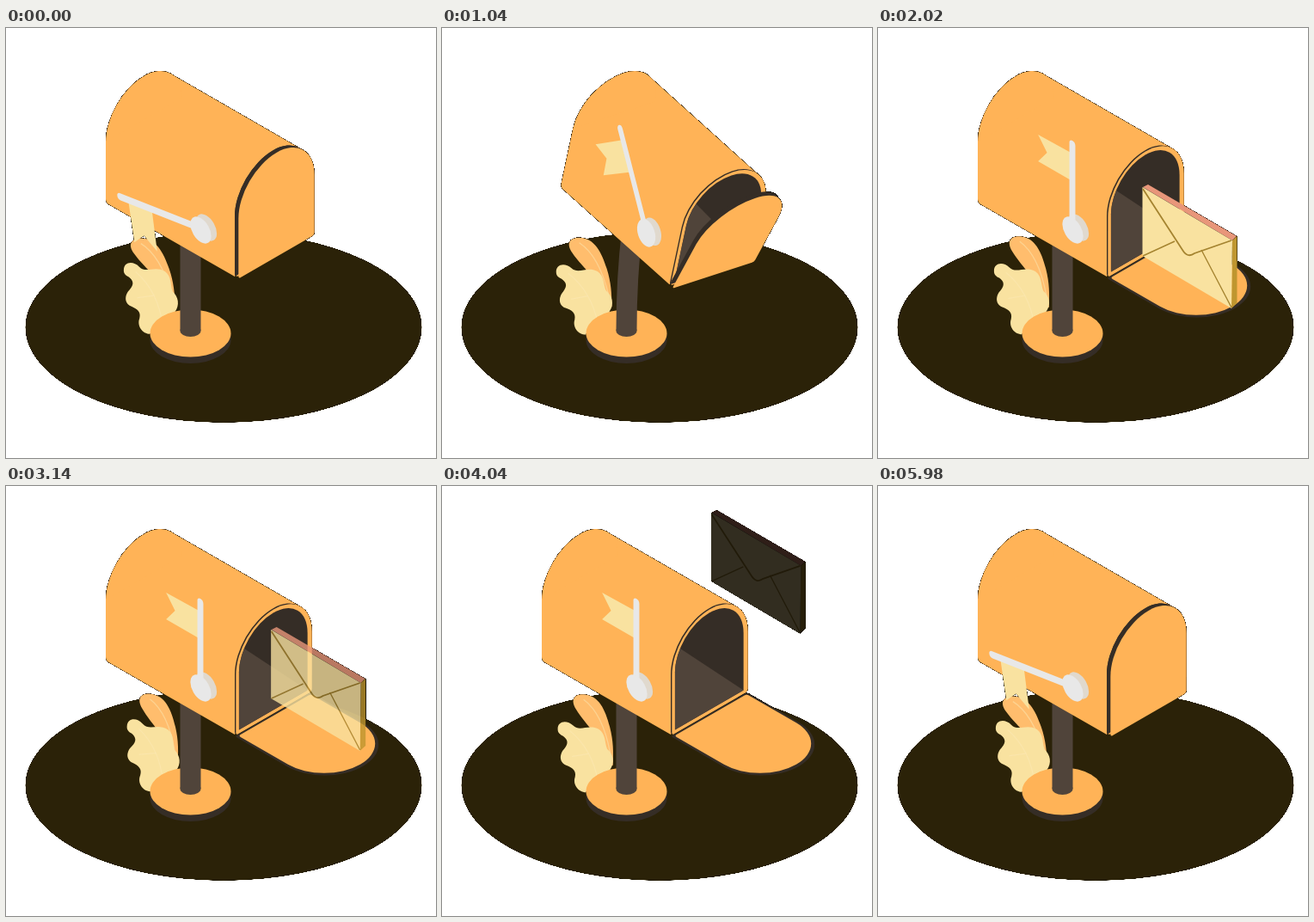
Recreate the animation shown at these times as an HTML page. Size 500 by 500 pixels, loop 6.02 s.

```html
<!DOCTYPE html>
<html lang="en">
<head>
<meta charset="utf-8">
<title>Mailbox</title>
<style>
html, body { margin: 0; width: 100%; height: 100%; overflow: hidden; background: #fff; }
svg { display: block; width: 100vw; height: 100vh; }
.orange { fill: #ffb357; }
.dark { fill: #352d26; }
.brown { fill: #50443a; }
.cream { fill: #f9e2a0; }
.light { fill: #e8e8e8; }
</style>
</head>
<body>
<svg viewBox="0 0 500 500">
  <defs>
    <!-- black matte behind every partly covered pixel -->
    <filter id="matte" filterUnits="userSpaceOnUse" x="0" y="0" width="500" height="500" color-interpolation-filters="sRGB">
      <feColorMatrix values="0 0 0 0 0  0 0 0 0 0  0 0 0 0 0  0 0 0 30 -2" result="black"/>
      <feMerge><feMergeNode in="black"/><feMergeNode in="SourceGraphic"/></feMerge>
    </filter>
    <clipPath id="mouth"><path d="M271 286V215C272 180 315 130 342 146L500 240V450Z"/></clipPath>
    <path id="arch" d="M0 3V70A51 51 0 0 0 102 70V3Q102 0 99 0H3Q0 0 0 3Z"/>
  </defs>
  <g filter="url(#matte)">
    <ellipse cx="253" cy="348" rx="230.5" ry="111" fill="#fac530" opacity=".173"/>

    <g id="leafBack">
      <path d="M197 325C190 296 168 278 157 259C150 247 156 241 167 242C184 244 191 260 196 280C200 296 200 310 199 325Z" fill="#ffbd6d"/>
      <path d="M166 248C182 260 191 282 196 310" fill="none" stroke="#fdd391" stroke-width="1.3"/>
    </g>
    <g id="leafFront">
      <path class="cream" d="M136 282C136 272 147 271 154 278C162 286 172 276 184 283C192 289 190 298 193 306C200 312 202 322 196 330L190 356H168C158 356 152 346 155 338C157 330 152 327 145 324C136 320 138 310 143 305C149 298 147 294 142 290C138 288 136 286 136 282Z"/>
      <path d="M150 284Q176 306 182 345M152 314L172 311" fill="none" stroke="#fbe6ad" stroke-width="1"/>
    </g>

    <path class="dark" d="M167.5 355V363A47 27 0 0 0 261.5 363V355Z"/>
    <ellipse class="orange" cx="214.5" cy="355" rx="47" ry="27.5"/>
    <ellipse class="brown" cx="214.5" cy="352" rx="12" ry="7"/>
    <path id="post" fill="none" stroke="#50443a" stroke-width="24"/>

    <g id="box">
      <path class="orange" d="M116 132V199Q116 204 121 206L266 289L341.2 139.5L191.2 53Z"/>
      <path class="orange" d="M0 70A51 51 0 0 0 102 70Z" transform="matrix(.866 -.5 0 -1 116 202.4)"/>
      <use href="#arch" class="dark" transform="matrix(.866 -.5 0 -1 266 289)"/>
      <use href="#arch" class="orange" transform="matrix(.866 -.5 0 -1 267.4 289.8)"/>
      <g transform="matrix(.866 -.5 0 -1 266.6 289)">
        <path class="dark" d="M5 3V70A46 46 0 0 0 97 70V3Z"/>
        <path class="brown" d="M5 3V70A46 46 0 0 0 12 94L97 3Z"/>
      </g>
      <use id="doorEdge" href="#arch" class="dark"/>
      <use id="doorFace" href="#arch" class="orange"/>

      <circle r="14" fill="#e0d9ce" transform="matrix(.866 .5 0 1 233 232)"/>
      <g transform="matrix(.866 .5 0 1 226 233)">
        <g id="flag">
          <path class="cream" d="M-3 -87L-46 -86L-34 -71L-46 -55L-3 -55Z"/>
          <path d="M0 0V-98" stroke="#e8e8e8" stroke-width="8" stroke-linecap="round"/>
        </g>
      </g>
      <circle class="light" r="14" transform="matrix(.866 .5 0 1 226.5 235)"/>
    </g>

    <g id="clip">
      <g id="letter">
        <path d="M308 185L314 182L417 242L412 247Z" fill="#e8967a"/>
        <path d="M412 247L417.500 242V320L411 326Z" fill="#bf962f"/>
        <path class="cream" d="M307.500 185L412 247L411 326L307.500 265Z"/>
        <g fill="none" stroke="#a58430" stroke-width="1.4">
          <path d="M308 265L345 248M411 325L376 258"/>
          <path d="M308 187L354 258Q360 268 368 262L411 247" stroke-width="1.8"/>
        </g>
      </g>
    </g>
  </g>
</svg>
<script>
const LOOP = 6020;
const el = id => document.getElementById(id);
const set = (id, name, value) => el(id).setAttribute(name, value);
const smooth = x => x * x * (3 - 2 * x);
const part = (t, from, to) => Math.min(1, Math.max(0, (t - from) / (to - from)));

// Eased value through [time, value] pairs
function key(t, keys) {
  let i = 1;
  while (i < keys.length - 1 && t > keys[i][0]) i++;
  const [t0, v0] = keys[i - 1], [t1, v1] = keys[i];
  return v0 + (v1 - v0) * smooth(part(t, t0, t1));
}

const SWING = [[0, 0], [780, -53], [1040, 12], [1295, -8.4], [1550, 6], [1790, -3], [2000, 0]];
const DOOR = [[900, 0], [1420, 90], [4400, 90], [5100, 0]];
const FLAG = [[800, 1], [1220, 0], [4500, 0], [5200, 1]];
const SLIDE = [[1480, -175], [2000, 0]];

function drawBox(t) {
  const a = key(t, SWING);
  const x = 214 + .67 * a, y = 252 + .0008 * a * a;
  set('box', 'transform', `translate(${x} ${y}) rotate(${a}) scale(${1 - .0014 * Math.abs(a)}) translate(-214 -252)`);
  set('post', 'd', `M214.500 352Q214.500 290 ${214.5 + .55 * a} ${y - 17}`);

  const down = key(t, FLAG);
  set('flag', 'transform', `rotate(${-99 * down}) translate(0 ${-11 * down})`);
}

// The door turns about its lower edge; past 45 degrees its inner side shows
function drawDoor(t) {
  const angle = key(t, DOOR), r = angle * Math.PI / 180;
  const c = Math.cos(r), s = Math.sin(r), open = angle > 45;
  const vx = .866 * s, vy = .5 * s - c;
  // d: distance along the normal, u and v: shift within the door, k: size
  const place = (id, d, u = 0, v = 0, k = 1) => {
    const x = 266 + .866 * (c * d + u) + vx * v;
    const y = 289 + (.5 * c + s) * d - .5 * u + vy * v;
    set(id, 'transform', `matrix(${.866 * k} ${-.5 * k} ${vx * k} ${vy * k} ${x} ${y})`);
  };
  if (open) {
    place('doorEdge', 2);
    place('doorFace', 0, 1, 4, .95);
  } else {
    place('doorEdge', 0);
    place('doorFace', 5);
  }
}

function drawLetter(t) {
  const u = key(t, SLIDE), rise = part(t, 2840, 4340), p = smooth(rise);
  set('letter', 'transform', `translate(${.866 * u + 6 * p} ${.5 * u - 172 * p})`);
  set('letter', 'opacity', 1 - rise);
  set('letter', 'visibility', t > 1480 && rise < .92 ? 'visible' : 'hidden');
  set('clip', 'clip-path', rise ? 'none' : 'url(#mouth)');
}

function drawLeaves(t) {
  const w = 2 * Math.PI * t / LOOP;
  set('leafBack', 'transform', `rotate(${-2.2 - 3 * Math.cos(w)} 190 350)`);
  set('leafFront', 'transform', `rotate(${2.6 * Math.cos(2 * w) - 1.5 * Math.cos(w) - .4} 180 355)`);
}

function frame() {
  const t = performance.now() % LOOP;
  for (const draw of [drawLeaves, drawBox, drawDoor, drawLetter]) draw(t);
  requestAnimationFrame(frame);
}
frame();
</script>
</body>
</html>
```
